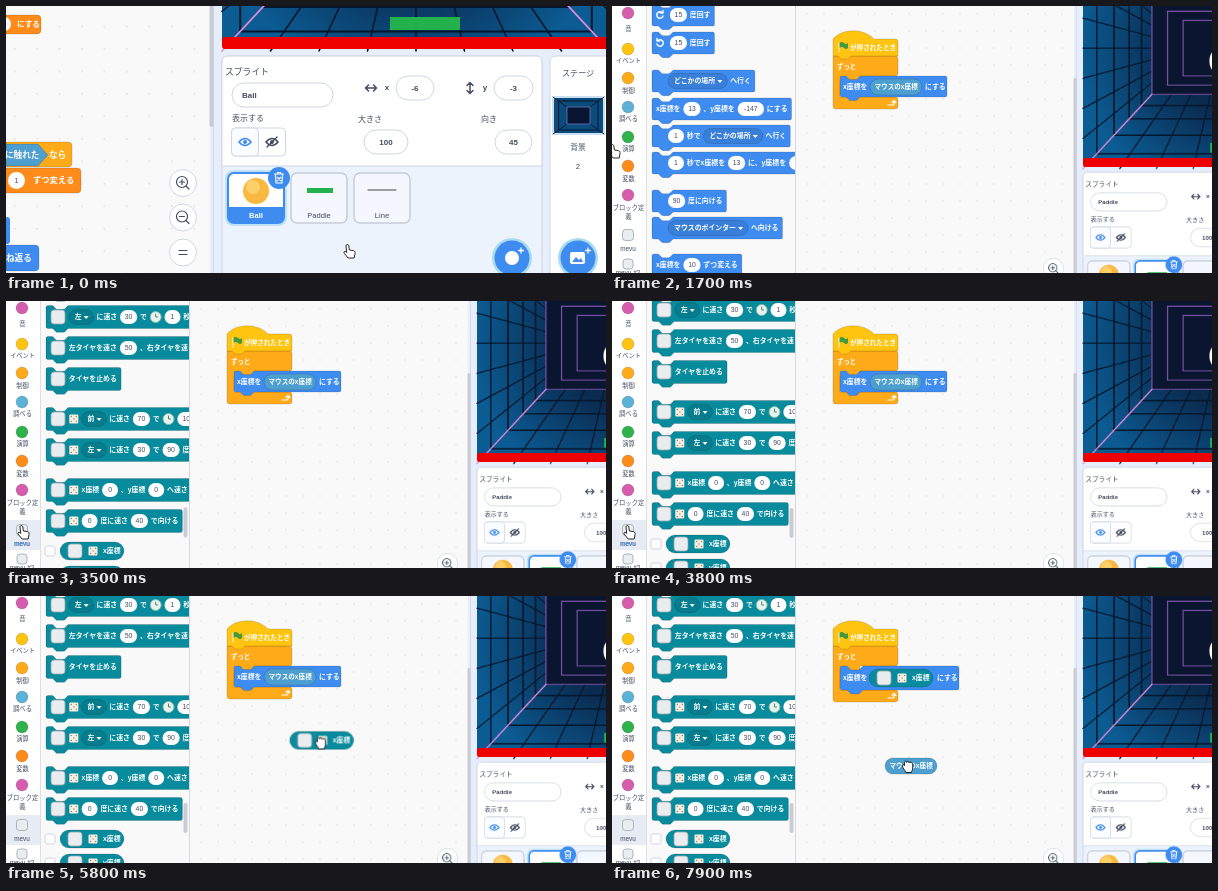
Write an HTML page that moves like this. It is 600 by 267 pixels and loops after 8 s.

```html
<!DOCTYPE html>
<html lang="ja">
<head>
<meta charset="utf-8">
<style>
html, body { margin: 0; width: 100%; height: 100%; overflow: hidden; background: #e6eefb; }
svg { display: block; width: 100vw; height: 100vh; }
text { font-family: "Liberation Sans", "Noto Sans CJK JP", "Noto Sans CJK", sans-serif; }
</style>
</head>
<body>
<svg id="stage" viewBox="0 0 600 267"></svg>
<script>
const LOOP = 8000, FS = 6.9;
const BLUE = '#3f8cf0', TEAL = '#078b9d', SKY = '#4c9fcf', GREEN = '#2fb24c',
  GOLD = '#ffab19', ORANGE = '#ff8c1a', YELLOW = '#ffc410', PINK = '#d65cae', INK = '#454c60', SEAM = '#06172c';

// ---------- drawing helpers ----------
const rect = (x, y, w, h, fill, r = 0, extra = '') =>
  `<rect x="${x}" y="${y}" width="${w}" height="${h}" rx="${r}" fill="${fill}" ${extra}/>`;
const circle = (x, y, r, fill, extra = '') => `<circle cx="${x}" cy="${y}" r="${r}" fill="${fill}" ${extra}/>`;
const path = (d, fill = 'none', extra = '') => `<path d="${d}" fill="${fill}" ${extra}/>`;
const line = (d, color, w = 1) => path(d, 'none', `stroke="${color}" stroke-width="${w}" stroke-linecap="round" stroke-linejoin="round"`);
const text = (x, y, s, size = FS, fill = '#fff', weight = 700, anchor = 'start') =>
  `<text x="${x}" y="${y + size * .36}" font-size="${size}" fill="${fill}" font-weight="${weight}" text-anchor="${anchor}">${s}</text>`;
const mid = (x, y, s, size, fill, weight = 500) => text(x, y, s, size, fill, weight, 'middle');
const group = (id, body) => `<g id="${id}">${body}</g>`;
const edge = 'stroke="#000" stroke-opacity=".2" stroke-width=".7"';
const border = 'stroke="#cfd6e2" stroke-width="1"';

const textWidth = s => [...s].reduce((w, c) => w + (c < '\u0250' ? .56 : 1), 0) * FS;
const cube = (x, y, size = 14) => rect(x - size / 2, y - size / 2, size, size, '#e9edf0', 3, 'stroke="#9aa5ad" stroke-width=".8"');
const dice = (x, y) => rect(x - 4.5, y - 4.5, 9, 9, '#f6efe2', 1) +
  line(`M${x - 2.5} ${y - 2.5}h.1M${x + 2.5} ${y - 2.5}h.1M${x} ${y}h.1M${x - 2.5} ${y + 2.5}h.1M${x + 2.5} ${y + 2.5}h.1`, '#a08a78', 1.4);
const turn = (x, y, f) => `<g transform="translate(${x} ${y}) scale(${f} 1)">` +
  line('M3 1A3.200 3.200 0 1 1 1.500-2.800M3-4.500V-2H.5', '#fff', 1.4) + '</g>';

// Item prefixes: ( input, [ menu, @ cube, # dice, > < turns, ! clock
function flow(x, y, items, gap = 2.8) {
  let out = '';
  for (const item of items) {
    const kind = item[0], s = item.slice(1);
    let w;
    if (kind === '(') {
      w = Math.max(16, s.length * 4.6 + 8);
      out += rect(x, y - 7, w, 14, '#fff', 7) + mid(x + w / 2, y, s, 6.8, INK);
    } else if (kind === '[') {
      w = textWidth(s) + 18;
      out += rect(x, y - 7.5, w, 15, '#00000018', 7.5, edge) + text(x + 6, y, s) +
        path(`M${x + w - 10} ${y - 1}h5l-2.500 3z`, '#fff');
    } else if (kind === '@') { w = 16; out += cube(x + 8, y); }
    else if (kind === '#') { w = 10; out += dice(x + 5, y); }
    else if (kind === '>' || kind === '<') { w = 11; out += turn(x + 4, y, kind === '>' ? 1 : -1); }
    else if (kind === '!') { w = 12; out += circle(x + 6, y, 5.5, '#e7f4ee', 'stroke="#7fb7a4"') + line(`M${x + 6} ${y - 3}v3h2`, '#55877a'); }
    else { w = textWidth(item); out += text(x, y, item); }
    x += w + gap;
  }
  return [out, x - gap];
}

function shape(x, y, w, h, color) {
  const s = h / 48, W = w / s;
  return path(`M0 4a4 4 0 0 1 4-4H12c2 0 3 1 4 2l4 4c1 1 2 2 4 2h12c2 0 3-1 4-2l4-4c1-1 2-2 4-2H${W - 4}a4 4 0 0 1 4 4V44a4 4 0 0 1-4 4H48c-2 0-3 1-4 2l-4 4c-1 1-2 2-4 2h-12c-2 0-3-1-4-2l-4-4c-1-1-2-2-4-2H4a4 4 0 0 1-4-4z`,
    color, `transform="translate(${x} ${y}) scale(${s})" stroke="#000" stroke-opacity=".2" stroke-width="1.5"`);
}

function block(y, color, items, h = 22) {
  const lead = '(['.includes(items[0][0]) ? 16 : 4;
  const [body, end] = flow(40 + lead, y, items);
  return shape(40, y - h / 2, end - 36, h, color) + body;
}
const pill = (x, y, w, h, color) => rect(x, y - h / 2, w, h, color, h / 2, edge);
const sensor = (x, y, label) => pill(x, y, 64, 18, TEAL) + flow(x + 7, y, ['@', '#', label], 5)[0];
const check = y => rect(39, y - 5, 10, 10, '#fff', 2, border);

// ---------- palette ----------
const motionList = [
  [9, '>', '(15', '度回す'], [37, '<', '(15', '度回す'],
  [75, '[どこかの場所', 'へ行く'], [103, 'x座標を', '(13', '、y座標を', '(-147', 'にする'],
  [130, '(1', '秒で', '[どこかの場所', 'へ行く'], [157, '(1', '秒でx座標を', '(13', 'に、y座標を', '(-147'],
  [195, '(90', '度に向ける'], [222, '[マウスのポインター', 'へ向ける'], [259, 'x座標を', '(10', 'ずつ変える']
].map(([y, ...items]) => block(y, BLUE, items)).join('');

const cubeList = [
  [-53, '@', '[前', 'に', '(1', '歩動かす'], [-22, '@', '[左', 'に', '(1', '回回す'],
  [9, '@', '[左', 'に速さ', '(30', 'で', '!', '(1', '秒'],
  [40, '@', '左タイヤを速さ', '(50', '、右タイヤを速さ'], [71, '@', 'タイヤを止める'],
  [111, '@', '#', '[前', 'に速さ', '(70', 'で', '!', '(100'],
  [142, '@', '#', '[左', 'に速さ', '(30', 'で', '(90', '度'],
  [182, '@', '#', 'x座標', '(0', '、y座標', '(0', 'へ速さ'],
  [213, '@', '#', '(0', '度に速さ', '(40', 'で向ける']
].map(([y, ...items]) => block(y, TEAL, items, 23)).join('') +
  check(243) + sensor(54, 243, 'x座標') + check(267) + sensor(54, 267, 'y座標');

const calc = (y, sign) => pill(40, y, 45, 17, GREEN) + rect(43, y - 6, 16, 12, '#fff', 6) +
  rect(66, y - 6, 16, 12, '#fff', 6) + mid(62.5, y, sign, 7, '#fff', 700);
const hex = (x, y, w, h, c) => path(`M${x} ${y}l${h / 2} ${-h / 2}H${x + w - h / 2}l${h / 2} ${h / 2}l${-h / 2} ${h / 2}H${x + h / 2}z`, c, edge);
const compare = (y, sign) => hex(39, y, 56, 18, GREEN) + rect(47, y - 6, 16, 12, '#fff', 6) +
  mid(68, y, sign, 7, '#fff', 700) + rect(73, y - 6, 16, 12, '#fff', 6) + mid(81, y, '50', 6.8, INK);
const logic = (y, s) => hex(39, y, 76, 18, GREEN) + hex(46, y, 20, 13, '#278f3d') + mid(77, y, s, FS, '#fff', 700) + hex(88, y, 20, 13, '#278f3d');
const heading = (y, s) => text(39, y, s, 7.6, INK);

const mathList = pill(38, 16, 66, 19, SKY) + text(43, 16, '2000年からの日数', 6.7) +
  check(45) + pill(53, 45, 43, 17, SKY) + text(57, 45, 'ユーザー名', 6.9) + heading(76, '演算') +
  ['+', '-', '*', '/'].map((s, i) => calc(97 + 21 * i, s)).join('') +
  pill(40, 191, 93, 18, GREEN) + flow(42, 191, ['(1', 'から', '(10', 'までの乱数'])[0] +
  ['&gt;', '&lt;', '='].map((s, i) => compare(222 + 21 * i, s)).join('') +
  ['かつ', 'または'].map((s, i) => logic(295 + 23 * i, s)).join('') +
  [0, 1, 2, 3, 4, 5].map(i => pill(40, 368 + 25 * i, 112, 18, GREEN) + flow(46, 368 + 25 * i, ['(りんご', 'の長さ', '(1'])[0]).join('') +
  heading(538, '変数') + rect(39, 552, 130, 18, '#fff', 3, border) + mid(104, 561, '変数を作る', FS, INK) +
  check(588) + pill(53, 588, 40, 17, ORANGE) + text(62, 588, '変数') +
  block(618, ORANGE, ['[変数', 'を', '(0', 'にする']) + block(646, ORANGE, ['[変数', 'を', '(1', 'ずつ変える']) +
  heading(700, 'ブロック定義') + rect(39, 714, 130, 18, '#fff', 3, border) + mid(104, 723, 'ブロックを作る', FS, INK) +
  heading(768, 'mevu');

const cats = [['音', PINK, 7, 23], ['イベント', YELLOW, 43, 55], ['制御', GOLD, 72, 85], ['調べる', '#5cb1d6', 101, 113],
  ['演算', GREEN, 131, 143], ['変数', ORANGE, 160, 173], ['ブロック定', PINK, 189, 202]]
  .map(([s, c, y, ty]) => circle(16, y, 6, c, edge) + mid(16.5, ty, s, 6.3, INK)).join('') + mid(16.5, 211, '義', 6.3, INK);
const sidebar = rect(0, 0, 34, 267, '#fff') + group('picked', rect(0, 219, 34, 30, '#e6ebf4')) + cats +
  cube(16, 229, 11) + mid(16, 243, 'mevu', 6.4, INK) + group('hover', mid(16, 243, 'mevu', 6.4, BLUE)) +
  cube(16, 258, 10) + mid(16, 267, 'mevu #2', 6.4, INK) + rect(34, 0, 1, 267, '#dcdfe5');

// ---------- workspace script ----------
function script(swapped) {
  const h = swapped ? 24 : 21, b = 70 + h, w = swapped ? 119 : 107;
  return path(`M221 50H283q3 0 3 3V67q0 3-3 3H248v5h-20V${b}H283q3 0 3 3v6q0 3-3 3H224q-3 0-3-3z`, GOLD, edge) +
    path('M221 50V33C230 22 252 22 262 33H283q3 0 3 3V50H239l-3 3h-7l-3-3z', YELLOW, edge) +
    path('M227 37q3-2 5 0t4 0v5q-2 2-4 0t-5 0z', '#45993d') + line('M227 37v9', '#fff', .9) +
    text(238, 42, 'が押されたとき', 6.6) + text(225, 60.5, 'ずっと', 6.4) +
    line(`M276 ${b + 8}h5q2-1 1-4m-2 1.500l2-2 2 2`, '#fff', 1.1) +
    shape(228, 70, w, h, BLUE) + text(231, 70 + h / 2, 'x座標を', 6.9) +
    (swapped ? sensor(257, 82, 'x座標') : mouseX(258, 81)) + text(swapped ? 325 : 313, 70 + h / 2, 'にする', 6.9);
}
function mouseX(x, y) { return pill(x, y, 52, 16, SKY) + text(x + 4.5, y, 'マウスのx座標', 6.6); }

const wide = rect(35, 0, 148, 267, '#f9f9f9') +
  `<g clip-path="url(#palette)">${group('motion', motionList)}${group('strip', cubeList + `<g transform="translate(0 -850)">${mathList}</g>`)}</g>` +
  group('thumb', rect(177.500, 207, 4, 30, '#c9ccd2', 2)) +
  sidebar + rect(183, 0, 279, 267, '#f9f9f9') + rect(184, 0, 277, 267, 'url(#dots)') + rect(183, 0, 1, 267, '#d5d9e0') +
  group('before', script(false)) + group('after', script(true));

const close = rect(0, 0, 204, 267, '#f9f9f9') +
  `<g transform="matrix(1.321 0 0 1.321 -406.200 -169.700)">${rect(300, 120, 161, 220, 'url(#dots)')}</g>` + group('ballCode',
  path('M0 9H31q4 0 4 4V24q0 4-4 4H0z', ORANGE, edge) + circle(-2, 18, 7, '#fff') + text(11, 18, 'にする', 7.6) +
  path('M0 136H62q4 0 4 4V157q0 4-4 4H0z', GOLD, edge) + path('M0 138H32l10 11-10 11H0z', SKY, edge) +
  text(-1, 149, 'に触れた', 8.6) + text(43, 149, 'なら', 8.6) +
  path('M0 162H71q4 0 4 4V183q0 4-4 4H0z', ORANGE, edge) + rect(2, 166, 17, 17, '#fff', 8.5) + mid(10.5, 174.5, '1', 7, INK) +
  text(27, 174.5, 'ずつ変える', 8.3) + rect(-3, 211, 7, 27, BLUE, 3) +
  path('M0 239H29q4 0 4 4V261q0 4-4 4H0z', BLUE, edge) + text(0, 252, 'ね返る', 8.6));

// ---------- stage picture: a tunnel in perspective ----------
function tunnel() {
  const cx = 410, cy = -114, near = [194, 159], far = [103, 61];
  const at = (u, v, f) => `${cx + u * (far[0] + (near[0] - far[0]) * f)} ${cy + v * (far[1] + (near[1] - far[1]) * f)}`;
  const ring = f => `M${at(-1, -1, f)}L${at(1, -1, f)}L${at(1, 1, f)}L${at(-1, 1, f)}z`;
  const ray = (u, v) => `M${at(u, v, 0)}L${at(u, v, 1)}`;
  let out = rect(216, -260, 388, 300, 'url(#wall)');
  for (let k = -.75; k < 1; k += .25)
    out += line(ray(k, -1) + ray(k, 1) + ray(-1, k) + ray(1, k), SEAM, 1.6);
  for (const f of [.15, .33, .55, .8]) out += line(ring(f), SEAM, 2);
  const back = s => rect(cx - far[0] * s, cy - far[1] * s, far[0] * s * 2, far[1] * s * 2, '#0a1530', 0, 'stroke="#7a54a8" stroke-width="1.4"');
  out += back(1) + back(.8) + back(.6) + line(ray(-1, -1) + ray(1, -1) + ray(-1, 1) + ray(1, 1), '#e58ad8', 1.8);
  return out + circle(406, -97, 23, '#fff') + rect(384, 11, 70, 13, '#22b14c') + rect(216, 31, 388, 12, '#ee0000', 3);
}

// ---------- sprite panel ----------
const field = (x, y, w, s) => rect(x, y - 12, w, 24, '#fff', 12, border) + mid(x + w / 2, y, s, 8, INK, 700);
const eye = (x, c) => path(`M${x - 6} 136q6-7 12 0q-6 7-12 0z`, 'none', `stroke="${c}" stroke-width="1.5"`) + circle(x, 136, 2, c);
function card(x, name, art, on) {
  const ring = on ? `stroke="${BLUE}" stroke-width="2"` : 'stroke="#c5cdd9" stroke-width="1.5"';
  const glow = on ? rect(x - 3, 164, 62, 56, '#bfe3f5', 8) : '';
  return glow + rect(x, 167, 56, 50, on ? '#fff' : '#f4f7fd', 6, ring) + art +
    (on ? path(`M${x} 201h56v11q0 5-5 5h-46q-5 0-5-5z`, BLUE) : '') + mid(x + 28, 209, name, 7.6, on ? '#fff' : INK, on ? 700 : 500) +
    (on ? circle(x + 51, 172, 11, BLUE) + line(`M${x + 46.500} 168h9m-6 0v-1.500h3v1.500m-5 1l.6 8h5.800l.6-8m-5 2.500l3 3m0-3l-3 3`, '#fff', 1.2) : '');
}
function details(active) {
  const ball = active === 'Ball', v = ball ? ['-6', '-3', '45'] : ['13', '-147', '90'];
  const bar = ball ? rect(203.500, -200, 4, 321, '#c9ccd4', 2) : rect(203.500, -75, 4, 270, '#c9ccd4', 2);
  return bar + text(236, 89, active, 8, INK, 700) + field(390, 82, 38, v[0]) + field(488, 82, 39, v[1]) + field(489, 136, 37, v[2]) +
    card(222, 'Ball', circle(250, 185, 13, '#f9b840') + circle(247, 181, 7, '#ffd069'), ball) +
    card(285, 'Paddle', rect(301, 182, 26, 5, '#22b14c'), !ball);
}
const zoomKey = (y, d) => circle(177, y, 13.5, '#fff', border) + line(d, INK, 1.2);
const lens = (y, plus) => circle(176, y - 1, 5.5, 'none', `stroke="${INK}" stroke-width="1.2"`) +
  line(`M180 ${y + 3}l3 3M173.500 ${y - 1}h5` + (plus ? 'm-2.500-2.500v5' : ''), INK, 1.2);
const addKey = x => circle(x, 252, 20, '#a9dcec') + circle(x, 252, 17.500, BLUE);

const right = rect(204, -270, 420, 570, '#e6eefb') + rect(207, -270, 1, 570, '#d5dbe6') + tunnel() +
  rect(216, 50, 320, 240, '#edf3fd', 6, border) + path('M216 160V56q0-6 6-6H530q6 0 6 6V160z', '#fff', border) +
  text(219, 66, 'スプライト', 8.8, INK, 500) + rect(226, 77, 101, 24, '#fff', 12, border) +
  line('M360 82h10m-7.500-3l-3 3 3 3m5-6l3 3-3 3M464 77v10m-3-7.500l3-3 3 3m-6 5l3 3 3-3', INK, 1.5) +
  mid(381, 81.500, 'x', 8, INK, 700) + mid(479, 81.500, 'y', 8, INK, 700) +
  text(226, 112.500, '表示する', 8, INK, 500) + text(352, 113, '大きさ', 8, INK, 500) + text(475, 113, '向き', 8, INK, 500) +
  rect(225.500, 122, 54, 28, '#fff', 4, border) + rect(225.500, 122, 27, 28, '#fafcff', 4, border) +
  eye(239, BLUE) + eye(266, INK) + line('M261 141l10-10', INK, 1.3) + field(358, 136, 44, '100') +
  card(348, 'Line', line('M362 184h28', '#444', 1), false) +
  group('ballInfo', details('Ball')) + group('paddleInfo', details('Paddle')) +
  addKey(506) + circle(506, 252, 7, '#fff') + line('M515 242v5m-2.500-2.500h5', '#fff', 1.3) +
  rect(544, 50, 70, 240, '#fff', 6, border) + text(556, 67, 'ステージ', 8.1, INK, 500) +
  rect(547, 91, 51, 37, '#0b4c7c', 3, 'stroke="#c9dff2" stroke-width="2"') +
  line('M547 91l14 10m37-10l-14 10m-37 27l14-10m37 10l-14-10M553 95h39v29h-39z', SEAM, 1) + rect(561, 101, 23, 17, '#071530', 0, 'stroke="#5669a8"') +
  mid(572, 141, '背景', 7.8, INK) + mid(572, 160, '2', 7.8, INK) +
  addKey(572) + rect(564, 246, 15, 12, '#fff', 2) + path('M566 256l4-5 3 3 2-2 2 4z', BLUE) + line('M582 242v5m-2.500-2.500h5', '#fff', 1.3) +
  zoomKey(177, '') + lens(177, true) + zoomKey(211.500, '') + lens(211.500) + zoomKey(246.500, 'M173 244.500h8m-8 4h8');

// ---------- cursor ----------
const ink = 'stroke="#111" stroke-width=".9" stroke-linejoin="round"';
const cursor = group('point', path('M-3-5c0-2 2.600-2 2.800 0l.6 4 4 .6c1.600.4 1.900 1.600 1.600 3l-.8 4.400h-6l-4-4.800c-1-1.600.8-2.400 1.800-1.400l.7.7z', '#fff', ink)) +
  group('grab', path('M-4.500 0c0-1.500 1.500-1.500 2-.5v-3c0-1.700 2-1.700 2.200 0 .2-1.700 2.300-1.600 2.300.2.300-1.200 2-1 2 .4.4-1 1.700-.6 1.700.6V2c0 2-1 2.500-1.300 4.500h-5.600c-.6-2.500-3.300-4-3.300-6.500z', '#fff', ink));

document.getElementById('stage').innerHTML = `<defs>
  <clipPath id="palette"><rect x="35" y="0" width="148" height="267"/></clipPath>
  <pattern id="dots" width="17" height="17" patternUnits="userSpaceOnUse">${circle(8, 8, .7, '#d9dbe0')}</pattern>
  <radialGradient id="wall" gradientUnits="userSpaceOnUse" cx="410" cy="-114" r="200">
    <stop offset=".4" stop-color="#0a2a4e"/><stop offset="1" stop-color="#0c5c94"/></radialGradient></defs>` +
  group('wide', wide) + group('close', close) + group('right', right) + group('popped', mouseX(273, 170)) +
  group('drag', group('halo', rect(52, 231.500, 68, 23, '#d8eef2', 11.500, 'stroke="#8fc5cf"')) + sensor(54, 243, 'x座標')) + group('cursor', cursor);

// ---------- motion ----------
const run = (id, keys) => document.getElementById(id).animate(keys, { duration: LOOP, iterations: Infinity });
const hold = (ms, props) => ({ offset: ms / LOOP, easing: 'step-end', ...props });
function show(id, from, to = LOOP) {
  const keys = [hold(0, { opacity: from ? 0 : 1 })];
  if (from) keys.push(hold(from, { opacity: 1 }));
  if (to < LOOP) keys.push(hold(to, { opacity: 0 }));
  run(id, [...keys, hold(LOOP, { opacity: to < LOOP ? 0 : 1 })]);
}
// Each leg: start ms, number of 100 ms steps, target x, target y
function move(id, x, y, legs) {
  const pose = () => ({ transform: `translate(${x}px, ${y}px)` });
  const keys = [hold(0, pose())];
  for (const [ms, n, toX, toY] of legs) {
    const fromX = x, fromY = y;
    for (let k = 1; k <= n; k++) {
      const t = k / n, ease = t * t * (3 - 2 * t);
      x = fromX + (toX - fromX) * ease;
      y = fromY + (toY - fromY) * ease;
      keys.push(hold(ms + (k - 1) * 100, pose()));
    }
  }
  run(id, [...keys, hold(LOOP, pose())]);
}

const CUT = 1700, PICK = 700, JUMP = 3000, DROP = 7200;
show('close', 0, CUT);
show('ballCode', 0, PICK);
show('ballInfo', 0, PICK);
show('paddleInfo', PICK);
show('wide', CUT);
const zoomedOut = { transform: 'matrix(.757, 0, 0, .757, 307.5, 128.5)' };
run('right', [hold(0, { transform: 'matrix(1, 0, 0, 1, 0, 0)' }), hold(CUT, zoomedOut), hold(LOOP, zoomedOut)]);

show('motion', 0, JUMP);
show('strip', JUMP);
show('thumb', JUMP);
show('picked', JUMP);
show('hover', 2500, 4100);
const glide = f => Array.from({ length: 9 }, (_, i) => [JUMP + i * 100, 1, 0, f * Math.round(850 * .383 ** i)]);
move('strip', 0, 850, glide(1));
move('thumb', 0, -62, glide(-.073));

show('before', 0, DROP);
show('after', DROP);
show('drag', 5200, DROP);
show('halo', 6700, DROP);
move('drag', 0, 0, [[5200, 8, 240, -103], [6400, 4, 197, -157]]);
show('popped', DROP);
move('popped', 11, -64, [[7500, 5, 0, 0]]);

show('point', 0, 4600);
show('grab', 4600);
move('cursor', 343, 245, [[500, 3, 314, 198], [CUT, 1, 2, 145], [2200, 4, 17, 231],
  [4100, 6, 86, 245], [5200, 8, 324, 142], [6400, 4, 277, 88], [DROP, 3, 306, 106], [7500, 5, 295, 170]]);
</script>
</body>
</html>
```
